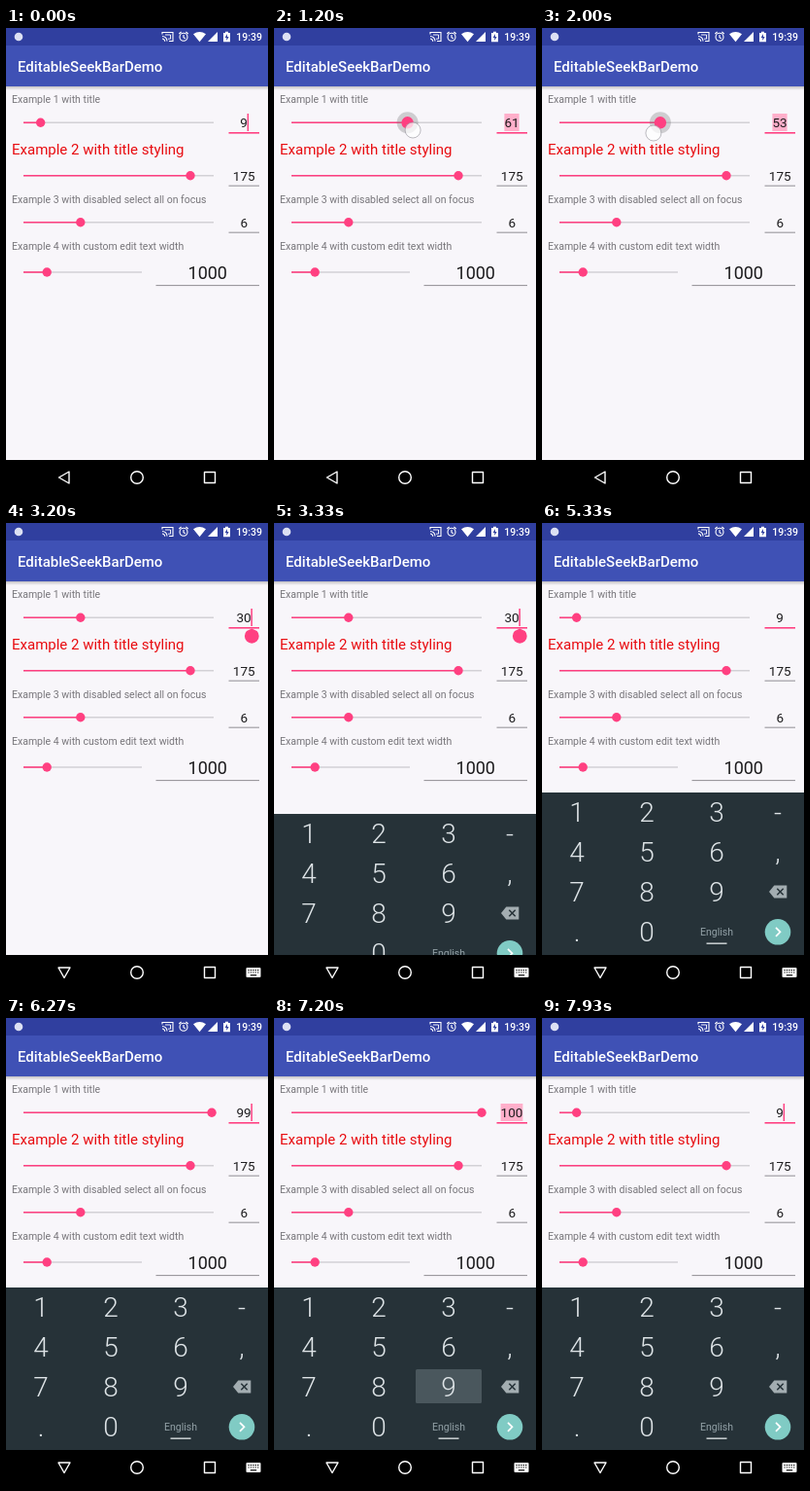
Recreate the animation shown at these times as an HTML page. Size 270x480 px, loop 8 s.

```html
<!DOCTYPE html>
<html lang="en">
<head>
<meta charset="utf-8">
<title>EditableSeekBarDemo</title>
<style>
  html, body { margin: 0; width: 100%; height: 100%; overflow: hidden; background: #000; }
  svg { display: block; width: 270px; height: 480px; font-family: Roboto, sans-serif; }
  .label { font-size: 10.5px; fill: #77757a; }
  .edit { font-size: 13.5px; fill: #1c1b1d; text-anchor: middle; }
  .rail { stroke: #d3d1d6; stroke-width: 1.5; }
  .fill { stroke: #ff4081; stroke-width: 1.6; }
  .thumb, .accent { fill: #ff4081; }
  .line { fill: #858388; }
  .key { font-size: 28px; font-weight: 300; fill: #dde3e6; text-anchor: middle; }
  .nav { fill: none; stroke: #fff; stroke-width: 1.4; stroke-linejoin: round; }
</style>
</head>
<body>
<svg viewBox="0 0 270 480">
  <defs>
    <linearGradient id="shade" x2="0" y2="1">
      <stop stop-color="#000" stop-opacity=".22"/>
      <stop offset="1" stop-color="#000" stop-opacity="0"/>
    </linearGradient>
  </defs>
  <rect width="270" height="480" fill="#f8f6fa"/>
  <rect y="60" width="270" height="4" fill="url(#shade)"/>
  <rect width="270" height="60" fill="#3f51b5"/>
  <rect width="270" height="18" fill="#303f9f"/>
  <text x="12" y="45" font-size="15" font-weight="500" fill="#fff">EditableSeekBarDemo</text>

  <!-- status bar -->
  <circle cx="13" cy="9" r="4.3" fill="#dce0f3"/>
  <g fill="none" stroke="#fff" stroke-width="1.1">
    <path d="M161 6.5V4.5H172V13.5H168M161 8.5a5 5 0 0 1 5 5M161 11a2.7 2.7 0 0 1 2.7 2.7"/>
    <path d="M164 7h5.5v4.2h-2.5" stroke-width=".9"/>
    <circle cx="183" cy="9.3" r="4"/>
    <path d="M183 7v2.7l1.8 1M178.3 6l2.3-2M187.7 6l-2.3-2"/>
  </g>
  <path d="M193 6.3Q199.5 1.8 206 6.3L199.5 14.2Z" fill="#fff"/>
  <path d="M208 14L218 4V14Z" fill="#fff"/>
  <path d="M224 5h2V3.8h3V5h2v9.3h-7Z" fill="#fff"/>
  <path d="M228 6l-2.3 4h1.6v3l2.3-4h-1.6Z" fill="#303f9f"/>
  <text x="264" y="13" font-size="10.5" font-weight="500" fill="#fff" text-anchor="end">19:39</text>

  <!-- form -->
  <text class="label" x="6" y="77">Example 1 with title</text>
  <text x="6" y="130.3" font-size="15" fill="#e80c10">Example 2 with title styling</text>
  <text class="label" x="6" y="179.7">Example 3 with disabled select all on focus</text>
  <text class="label" x="6" y="227.7">Example 4 with custom edit text width</text>
  <g id="bars"></g>

  <path class="rail" d="M18 97.3H214"/>
  <path class="fill" id="fill"/>
  <circle id="ripple" cy="97.3" r="11" fill="#77757a"/>
  <circle class="thumb" id="thumb" cy="97.3"/>
  <rect id="select" y="88" height="18" fill="#ffafca"/>
  <text class="edit" id="value" x="245" y="102.3"></text>
  <rect class="accent" x="229.5" y="107" width="31.5" height="1.6"/>
  <rect class="accent" id="caret" y="88" width="1.5" height="18"/>
  <path class="accent" id="handle" d="M253.3 108.5l5.3 2.6a7.4 7.4 0 1 1-10.6 0Z"/>

  <!-- keyboard -->
  <g id="board">
    <rect y="277" width="270" height="204" fill="#263238"/>
    <rect id="press" x="146" y="361" width="68" height="35" rx="1.5" fill="#4b585e"/>
    <g id="keys"></g>
    <path d="M234 379l5.3-6.5h13v13h-13Z" fill="#a3adb1"/>
    <path d="M242.3 375.8l6.4 6.4m0-6.4l-6.4 6.4" stroke="#263238" stroke-width="1.5"/>
    <text x="180" y="423.8" font-size="10.5" fill="#92a0a6" text-anchor="middle">English</text>
    <rect x="169.5" y="431.5" width="21" height="1.3" fill="#e5eaec"/>
    <circle cx="243" cy="420.3" r="13.3" fill="#80cbc4"/>
    <path d="M241 415.8l4.5 4.5l-4.5 4.5" fill="none" stroke="#fff" stroke-width="1.7"/>
  </g>

  <!-- navigation bar -->
  <rect y="444" width="270" height="36"/>
  <path class="nav" id="back" d="M54.5 462L65 456V468Z"/>
  <path class="nav" id="hide" d="M54 457H66L60 467.5Z"/>
  <circle class="nav" cx="135" cy="462" r="6.3"/>
  <rect class="nav" x="204.5" y="456.5" width="11" height="11"/>
  <g id="ime">
    <rect x="247.5" y="457" width="15" height="10" rx="1" fill="#fff"/>
    <path d="M249.5 459.6h11M249.5 462h11" stroke="#000" stroke-width="1.2" stroke-dasharray="1.2 1.2"/>
    <path d="M251.8 464.8h6.4" stroke="#000" stroke-width="1.2"/>
  </g>

  <circle id="touch" r="8" fill="#fff" fill-opacity=".72" stroke="#8f8d96" stroke-opacity=".65" stroke-width=".9"/>
</svg>
<script>
const LOOP = 8000;
const $ = id => document.getElementById(id);
const set = (id, attrs) => { for (const k in attrs) $(id).setAttribute(k, attrs[k]); };
const show = (id, on) => set(id, { visibility: on ? 'visible' : 'hidden' });
const within = (t, spans) => spans.some(([a, b]) => t >= a && t < b);
const clamp = x => Math.max(0, Math.min(1, x));

// Piecewise linear value of [time, value] points
function track(points, t) {
  if (t <= points[0][0]) return points[0][1];
  for (let i = 1; i < points.length; i++) {
    const [a, u] = points[i - 1], [b, v] = points[i];
    if (t < b) return u + (v - u) * (t - a) / (b - a);
  }
  return points[points.length - 1][1];
}

// Static rows: y, rail end, thumb x, edit left, underline y, text, size
$('bars').innerHTML = [
  [151.8, 214, 190, 229.5, 161.7, '175', 13.5],
  [199.8, 214, 76.8, 229.5, 209.7, '6', 13.5],
  [251, 140, 42.2, 154.5, 264.2, '1000', 18]
].map(([y, end, x, left, base, text, size]) => `
  <path class="rail" d="M18 ${y}H${end}"/><path class="fill" d="M18 ${y}H${x}"/>
  <circle class="thumb" cx="${x}" cy="${y}" r="4.7"/>
  <text class="edit" style="font-size:${size}px" x="${(left + 261) / 2}" y="${y + size * .37}">${text}</text>
  <rect class="line" x="${left}" y="${base}" width="${261 - left}" height=".9"/>`).join('');

$('keys').innerHTML = ['123-', '456,', '789', '.0'].map((row, r) =>
  [...row].map((c, i) =>
    `<text class="key" x="${i < 3 ? 36 + 72 * i : 243}" y="${307 + 41 * r}">${c}</text>`
  ).join('')).join('');

const drag = [[600, 9], [930, 36], [1200, 61.3], [1330, 69], [1530, 71], [1730, 71],
  [2000, 53.3], [2270, 39], [2530, 30.3]];
const fingerX = [[530, 36], [930, 94], [1200, 143], [1330, 156], [1530, 158], [1700, 157],
  [2000, 115], [2270, 88], [2530, 74]];
const fingerY = [[530, 102], [1200, 105], [2000, 108], [2530, 109]];
const presses = [[3870, 4270], [4800, 5130], [5870, 6270], [7070, 7400], [7600, 7930]];
const typed = [[3937, 100], [4867, 9], [5937, 99], [7137, 100], [7667, 9]];
const selected = [[530, 3030], [3937, 4867], [7137, 7667]];
const carets = [[0, 330], [3030, 3530], [4867, 5330], [5870, 6470], [6930, 7137], [7667, LOOP]];

function draw(t) {
  let value = Math.floor(track(drag, t));
  for (const [at, v] of typed) if (t >= at) value = v;
  const x = 18 + 1.96 * value;
  const half = String(value).length * 3.8;
  const held = within(t, [[530, 2600]]);

  set('fill', { d: `M18 97.3H${x}` });
  set('thumb', { cx: x, r: held ? 6.2 : 4.7 });
  set('ripple', { cx: x, opacity: .32 * clamp((t - 530) / 130) * clamp((2800 - t) / 200) });
  $('value').textContent = value;
  set('select', { x: 245 - half, width: 2 * half });
  show('select', within(t, selected));
  set('caret', { x: 244.8 + half });
  show('caret', within(t, carets));
  show('handle', within(t, [[3030, 3870]]));

  const typing = t >= 3130;
  show('ime', typing);
  show('hide', typing);
  show('back', !typing);
  const rise = clamp((t - 3210) / 190);
  set('board', { transform: `translate(0 ${167 * (1 - rise) ** 2})` });
  show('board', rise > 0);

  const press = presses.find(p => within(t, [p]));
  set('press', { opacity: press ? clamp((press[1] - t) / 200) : 0 });

  const tap = within(t, [[2900, 3030]]);
  const key = press && t < press[0] + 130;
  show('touch', held || tap || key);
  if (held) set('touch', { cx: track(fingerX, t), cy: track(fingerY, t) });
  else if (tap) set('touch', { cx: 251, cy: 101 });
  else if (key) set('touch', { cx: 181, cy: 384 });
}

const start = performance.now();
function tick() {
  draw((performance.now() - start) % LOOP);
  requestAnimationFrame(tick);
}
tick();
</script>
</body>
</html>
```
